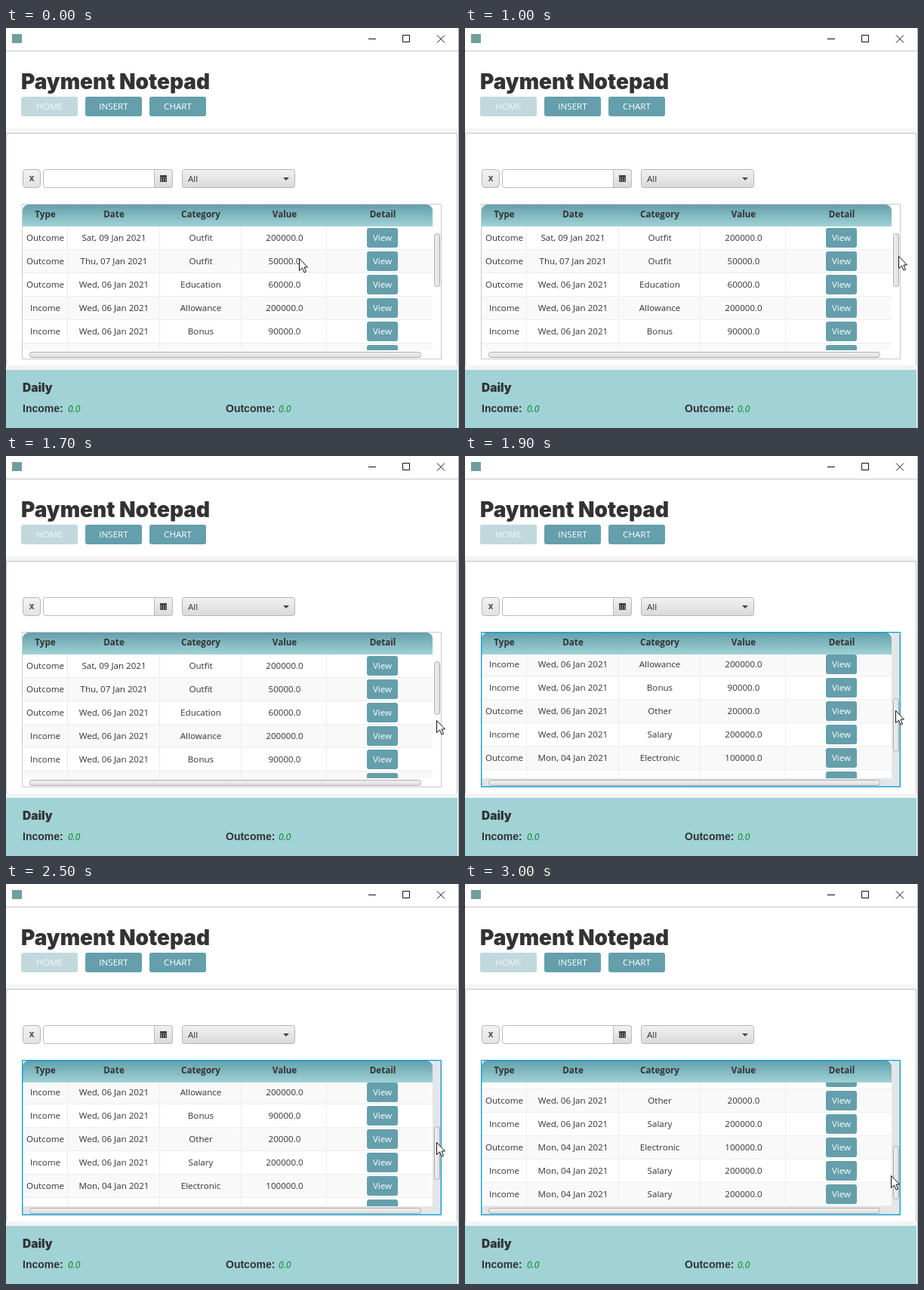
Write an HTML page with a canvas that moves like this. It is 600x530 px and loops after 3.1 s.

```html
<!DOCTYPE html>
<html lang="en">
<head>
<meta charset="utf-8">
<title>Payment Notepad</title>
<style>
html, body { margin: 0; width: 600px; height: 530px; overflow: hidden; background: #fff; }
canvas { display: block; }
</style>
</head>
<body>
<canvas id="stage" width="600" height="530"></canvas>
<script>
const ctx = document.getElementById('stage').getContext('2d');
const LOOP = 3100, STEP = 100;
const TEAL = '#649fab', PALE = '#a0d2d6', INK = '#333';
const UI = '"Open Sans", "Noto Sans", sans-serif';
const BLACK = 'Inter, sans-serif';
const ARIAL = '"Liberation Sans", Arial, sans-serif';

const COLUMNS = [
  { title: 'Type', mid: 52, end: 81 },
  { title: 'Date', mid: 143, end: 203 },
  { title: 'Category', mid: 258, end: 311 },
  { title: 'Value', mid: 369, end: 424 },
  { title: 'Detail', mid: 499, end: 565 }
];
const ROWS = [
  ['Outcome', 'Sat, 09', 'Outfit', 200000],
  ['Outcome', 'Thu, 07', 'Outfit', 50000],
  ['Outcome', 'Wed, 06', 'Education', 60000],
  ['Income', 'Wed, 06', 'Allowance', 200000],
  ['Income', 'Wed, 06', 'Bonus', 90000],
  ['Outcome', 'Wed, 06', 'Other', 20000],
  ['Income', 'Wed, 06', 'Salary', 200000],
  ['Outcome', 'Mon, 04', 'Electronic', 100000],
  ['Income', 'Mon, 04', 'Salary', 200000],
  ['Income', 'Mon, 04', 'Salary', 200000]
].map(([type, day, category, value]) =>
  [type, day + ' Jan 2021', category, value.toFixed(1)]);
const ROW_H = 31, VIEW_TOP = 263, VIEW_BOTTOM = 427;
const MAX_SCROLL = 146, THUMB_TRAVEL = 75;

// Pointer path: time, x, y
const PATH = [
  [0, 388, 305], [100, 390, 305], [500, 579, 303], [700, 579, 302], [1000, 574, 302],
  [1300, 574, 304], [1700, 570, 350], [1800, 570, 350], [2000, 570, 324],
  [2300, 570, 342], [2500, 570, 342], [2700, 568, 386], [3000, 564, 386], [3100, 564, 386]
];

function pointerAt(t) {
  const i = Math.max(1, PATH.findIndex(p => p[0] >= t));
  const [t0, x0, y0] = PATH[i - 1], [t1, x1, y1] = PATH[i];
  const u = (t - t0) / (t1 - t0), e = u * u * (3 - 2 * u);
  return [Math.round(x0 + (x1 - x0) * e), Math.round(y0 + (y1 - y0) * e)];
}

// The first jump is a click on the track, the second a drag of the thumb.
function thumbShift(t, pointerY) {
  if (t < 1800) return 0;
  if (t < 2500) return 49;
  return Math.min(THUMB_TRAVEL, 49 + pointerY - 342);
}

function rect(x, y, w, h, fill) {
  ctx.fillStyle = fill;
  ctx.fillRect(x, y, w, h);
}

function box(x, y, w, h, radius, fill, stroke) {
  ctx.beginPath();
  ctx.roundRect(x, y, w, h, radius);
  if (fill) { ctx.fillStyle = fill; ctx.fill(); }
  if (stroke) { ctx.strokeStyle = stroke; ctx.lineWidth = 1; ctx.stroke(); }
}

function shade(x0, y0, x1, y1, from, to) {
  const g = ctx.createLinearGradient(x0, y0, x1, y1);
  g.addColorStop(0, from);
  g.addColorStop(1, to);
  return g;
}

function text(str, x, y, font, color = INK, align = 'left') {
  ctx.font = font;
  ctx.fillStyle = color;
  ctx.textAlign = align;
  ctx.fillText(str, x, y);
}

const label = (str, x, y, color, weight = 400) =>
  text(str, x, y, `${weight} 11.6px ${UI}`, color, 'center');

function polyline(points, color) {
  ctx.beginPath();
  points.forEach(([x, y]) => ctx.lineTo(x, y));
  ctx.strokeStyle = color;
  ctx.lineWidth = 1;
  ctx.stroke();
}

function drawWindow() {
  rect(0, 0, 600, 530, '#fff');
  rect(8, 8, 13, 12, '#729d9d');
  rect(480, 14, 10, 1, '#111');
  box(525.5, 9.5, 9, 9, 0, null, '#111');
  polyline([[571, 9.5], [581, 19.5]], '#111');
  polyline([[581, 9.5], [571, 19.5]], '#111');
  rect(0, 30, 600, 1, '#c4c4c4');

  text('Payment Notepad', 20, 81, `900 28px ${BLACK}`);
  ['HOME', 'INSERT', 'CHART'].forEach((name, i) => {
    const x = 20 + i * 85;
    box(x, 91, 75, 26, 3, i ? TEAL : '#c1d8dd');
    label(name, x + 37.5, 108, i ? '#fff' : '#f4f8f9');
  });

  rect(0, 133, 598, 6, '#f4f4f4');
  box(0.5, 139.5, 597, 308, 0, '#fff', '#c4c4c4');
  rect(0, 447, 598, 6, '#f4f4f4');
  rect(0, 453, 598, 77, PALE);
  rect(599, 0, 1, 530, '#aaa');

  text('Daily', 22, 482, `900 15.5px ${BLACK}`);
  [['Income:', 22, 82], ['Outcome:', 291, 361]].forEach(([name, x, valueX]) => {
    text(name, x, 509, `bold 14px ${ARIAL}`);
    text('0.0', valueX, 509, `italic 12px ${UI}`, '#078a1b');
  });
}

function drawFilters() {
  const grey = shade(0, 188, 0, 212, '#f1f1f1', '#d9d9d9');
  box(22.5, 187.5, 23, 24, 4, shade(0, 188, 0, 212, '#f2f2f2', '#e2e2e2'), '#b5b5b5');
  label('x', 34, 203, '#555', 700);
  box(49.5, 187.5, 171, 24, 3, '#fff', '#b9b9b9');
  box(196.5, 187.5, 24, 24, [0, 3, 3, 0], grey, '#b9b9b9');
  rect(204, 195, 9, 9, '#444');
  for (let i = 0; i < 9; i++) rect(205 + i % 3 * 3, 198 + Math.floor(i / 3) * 2, 1, 1, '#ccc');
  box(233.5, 187.5, 149, 24, 3, grey, '#b5b5b5');
  text('All', 241, 204, `11.6px ${UI}`);
  ctx.beginPath();
  [[367, 198], [375, 198], [371, 202]].forEach(([x, y]) => ctx.lineTo(x, y));
  ctx.fillStyle = '#444';
  ctx.fill();
}

function drawRow(cells, index, scroll) {
  const top = VIEW_TOP + index * ROW_H - scroll;
  if (top > VIEW_BOTTOM || top + ROW_H < VIEW_TOP) return;
  rect(22, top, 543, ROW_H, index % 2 ? '#f9f9f9' : '#fff');
  rect(22, top + ROW_H - 1, 543, 1, '#eee');
  COLUMNS.slice(0, 4).forEach(({ mid, end }, i) => {
    rect(end, top, 1, ROW_H, '#ededed');
    label(cells[i], mid, top + 19, INK);
  });
  box(478, top + 2, 41, 26, 3, TEAL);
  label('View', 498.5, top + 19, '#fff');
}

function drawTable(shift) {
  const active = shift > 0;
  const scroll = Math.round(shift * MAX_SCROLL / THUMB_TRAVEL);
  rect(22, 234, 554, 204, '#fff');
  if (active) {
    rect(565, 235, 11, 203, '#e3e6e8');
    rect(22, 427, 554, 11, '#e3e6e8');
  }

  ctx.save();
  ctx.beginPath();
  ctx.rect(22, VIEW_TOP, 543, VIEW_BOTTOM - VIEW_TOP);
  ctx.clip();
  ROWS.forEach((cells, i) => drawRow(cells, i, scroll));
  ctx.restore();

  box(22, 234, 543, 29, [8, 8, 0, 0], shade(0, 234, 0, 263, TEAL, PALE));
  COLUMNS.forEach(({ title, mid }) => label(title, mid, 251, INK, 700));

  box(567.5, 272.5 + shift, 7, 70, 3, shade(567, 0, 575, 0, '#f3f3f3', '#dcdcdc'), '#aaa');
  box(31.5, 429.5, 518, 7, 3, shade(0, 429, 0, 437, '#f3f3f3', '#dcdcdc'), '#aaa');

  box(21.5, 233.5, 555, 205, 0, null, active ? '#159fd0' : '#c8c8c8');
  if (active) box(22.5, 234.5, 553, 203, 0, null, 'rgba(3,158,211,.4)');
}

function drawPointer(x, y) {
  const shape = [[0, 0], [0, 16], [4, 12.5], [6.5, 18.5], [9, 17.5], [6.5, 11.5], [11, 11.5]];
  ctx.beginPath();
  shape.forEach(([dx, dy]) => ctx.lineTo(x + dx + 0.5, y + dy + 0.5));
  ctx.closePath();
  ctx.fillStyle = '#fff';
  ctx.fill();
  ctx.strokeStyle = '#111';
  ctx.lineWidth = 1;
  ctx.stroke();
}

const start = performance.now();
function draw(now) {
  const t = Math.floor(Math.max(0, now - start) % LOOP / STEP) * STEP;
  const [x, y] = pointerAt(t);
  drawWindow();
  drawFilters();
  drawTable(thumbShift(t, y));
  drawPointer(x, y);
  requestAnimationFrame(draw);
}
draw(start);
</script>
</body>
</html>
```
